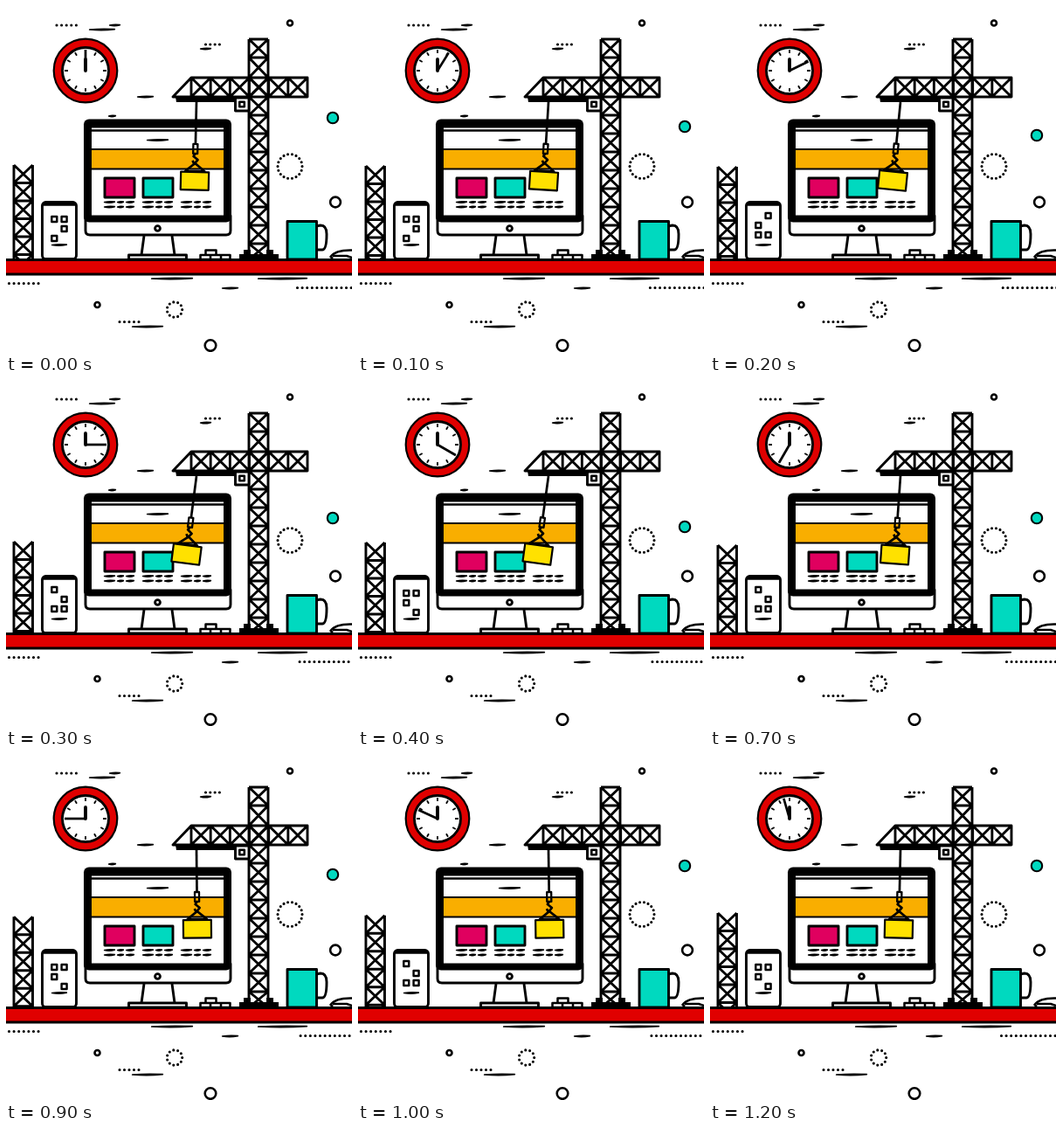
Recreate the animation shown at these times as an HTML page. Size 396 px wide and 396 px high, loop 1.3 s.

```html
<!DOCTYPE html>
<html lang="en">
<head>
<meta charset="utf-8">
<title>Website under construction</title>
<style>
  html, body { margin: 0; width: 100%; height: 100%; overflow: hidden; background: #fff; }
  #stage { display: block; width: 100vw; height: 100vh; stroke: #000; stroke-width: 2.9; fill: none; stroke-linejoin: round; }
  .dots { stroke-linecap: round; stroke-width: 3.1; }
  .ink { fill: #000; stroke-width: 1.7; }
  .white { fill: #fff; }
  .red { fill: #e00000; }
  .teal { fill: #00d9bf; }
</style>
</head>
<body>
<svg id="stage" viewBox="0 0 396 396">
  <g id="marks"></g>

  <g id="clock">
    <circle class="red" cx="91" cy="74" r="36.3" stroke-width="2.2"/>
    <circle class="white" cx="91" cy="74" r="26.5"/>
    <path id="ticks" stroke-width="1.8"/>
    <path d="M91 61V74" stroke-width="3.8" stroke-linecap="round"/>
    <path id="minute" d="M91 74V50" stroke-width="2.7"/>
  </g>

  <g id="monitor">
    <path class="white" d="M91 240H257V257Q257 262 252 262H96Q91 262 91 257Z"/>
    <rect x="89" y="129.500" width="169" height="118" rx="6" fill="#000" stroke="none"/>
    <rect class="white" x="98" y="139.500" width="151" height="100" stroke="none"/>
    <path d="M98 142.500H249" stroke-width="2.4"/>
    <rect x="98" y="164" width="151" height="22.500" fill="#f9ae00" stroke="none"/>
    <path d="M98 164H249M98 186.500H249" stroke-width="2.2"/>
    <rect x="113" y="197" width="34" height="22" fill="#e0005f"/>
    <rect class="teal" x="157" y="197" width="34" height="22"/>
    <circle cx="173.500" cy="254.500" r="2.9"/>
    <path d="M158 263L155 285M190 263L193 285"/>
    <rect class="white" x="140.500" y="285" width="66" height="5"/>
  </g>
  <g id="text"></g>

  <g stroke-width="2.5">
    <rect class="white" x="222.500" y="285" width="34" height="5"/>
    <path d="M228.500 285V279.500H240.500V285M234 285V290M246 285V290"/>
  </g>

  <path id="crane"/>
  <path d="M194 104H262V110H195ZM272 279H280V284H298V279H306V284H312V290H267V284H272Z" fill="#000" stroke="none"/>
  <rect class="white" x="262.500" y="105" width="15.500" height="15"/>
  <rect x="267.300" y="109.800" width="5.500" height="5.500" stroke-width="2.600"/>

  <g id="load" stroke-width="2.700">
    <path d="M218 110V158"/>
    <rect x="215.500" y="158" width="5" height="11" stroke-width="2.300"/>
    <path d="M218 169L216 172L221 176L217 181L215 177M218 180L207 189H229L218 180"/>
    <rect x="202" y="190" width="32" height="20.500" fill="#ffe100" stroke-width="2.200"/>
  </g>

  <svg width="396" height="290"><path id="tower"/></svg>

  <rect class="white" x="41.500" y="224.500" width="39" height="65" rx="4"/>
  <path d="M43 226.500H79" stroke-width="4.500"/>
  <path id="windows" stroke-width="2.400"/>

  <path d="M355 252L360 251Q367 251 367 261Q367 279 362 279H356"/>
  <rect class="teal" x="322" y="246.500" width="33.500" height="43.500"/>
  <path d="M396 279.500Q377 279 371.500 287L374 289M374 286H390L396 288" stroke-width="2.500"/>

  <rect class="red" x="-4" y="290.500" width="404" height="16.500"/>

  <circle id="ball" class="teal" cx="374" cy="128" r="6.200" stroke-width="2.100"/>
  <g id="slider"></g>
</svg>

<script>
const $ = id => document.getElementById(id);
const NS = 'http://www.w3.org/2000/svg';

function add(parent, tag, attrs) {
  const el = document.createElementNS(NS, tag);
  for (const k in attrs) el.setAttribute(k, attrs[k]);
  $(parent).append(el);
}

// A hand-drawn dash, thicker in the middle.
function dash(parent, x1, x2, y) {
  const m = (x1 + x2) / 2;
  add(parent, 'path', { class: 'ink', d: `M${x1 + .7} ${y}Q${m} ${y - 1.1} ${x2 - .7} ${y - .3}Q${m} ${y + 1.6} ${x1 + .7} ${y}Z` });
}

function dots(parent, x, y, n, gap) {
  let d = '';
  for (let i = 0; i < n; i++) d += `M${x + i * gap} ${y}h.01`;
  add(parent, 'path', { class: 'dots', d });
}

function dotRing(cx, cy, r, n) {
  let d = '';
  for (let i = 0; i < n; i++) {
    const a = i / n * 2 * Math.PI;
    d += `M${cx + r * Math.cos(a)} ${cy + r * Math.sin(a)}h.01`;
  }
  add('marks', 'path', { class: 'dots', d });
}

const ring = (cx, cy, r) => add('marks', 'circle', { cx, cy, r, 'stroke-width': 2.6 });
const cross = (x1, y1, x2, y2) => `M${x1} ${y1}L${x2} ${y2}M${x2} ${y1}L${x1} ${y2}`;

function mast(x1, x2, ys) {
  let d = `M${x1} ${ys[0]}V${ys.at(-1)}M${x2} ${ys[0]}V${ys.at(-1)}`;
  for (let i = 1; i < ys.length; i++) d += cross(x1, ys[i - 1], x2, ys[i]) + `M${x1} ${ys[i]}H${x2}`;
  return d;
}

[[118, 131, 22], [95, 125, 27], [222, 235, 49], [150, 169, 104], [117, 126, 126],
 [166, 214, 312], [288, 345, 312], [247, 266, 323], [144, 180, 367]]
  .forEach(a => dash('marks', ...a));
dots('marks', 58, 22, 5, 5.6);
dots('marks', 228.5, 44, 4, 5.3);
dots('marks', 3.5, 317.5, 7, 5.6);
dots('marks', 130, 361.5, 5, 5.5);
dots('slider', 333.5, 322.5, 13, 5.6);
ring(325, 19.5, 3);
ring(377, 224.5, 5.9);
ring(104.5, 342, 3);
ring(234, 388.5, 6.3);
dotRing(325, 183.5, 14, 18);
dotRing(193, 347.5, 8.7, 11);

dash('text', 161, 186, 153.5);
for (const x of [112, 156, 200])
  for (const y of [224.5, 230]) {
    dash('text', x, x + 13, y);
    dash('text', x + 15, x + 23, y);
    dash('text', x + 25, x + 35, y);
  }
dash('text', 52, 70, 273.5);
$('windows').after($('text').lastChild);

let ticks = '';
for (let i = 0; i < 12; i++) {
  const a = i * Math.PI / 6, s = Math.sin(a), c = Math.cos(a);
  ticks += `M${91 + 20 * s} ${74 - 20 * c}L${91 + 24 * s} ${74 - 24 * c}`;
}
$('ticks').setAttribute('d', ticks);

const levels = [38, 59, 82, 104];
for (let i = 1; i < 9; i++) levels.push(104 + i * 21);
levels.push(290);
let crane = mast(278, 300, levels) + 'M278 38H300M191 104L212 82H345V104Z';
for (let i = 0; i < 6; i++) {
  const x = 212 + i * 22.17;
  crane += cross(x, 82, x + 22.17, 104) + `M${x} 82V104`;
}
$('crane').setAttribute('d', crane);
$('tower').setAttribute('d', mast(9, 30.5, [0, 1, 2, 3, 4, 5, 6].map(i => 182 + i * 20.5)));

// Keys are [step, value] pairs, joined by straight lines.
function track(keys, t) {
  const i = Math.max(1, keys.findIndex(k => k[0] >= t));
  const [t0, v0] = keys[i - 1], [t1, v1] = keys[i];
  return v0 + (v1 - v0) * (t - t0) / (t1 - t0);
}

const drift = [[0, 0], [7, 1], [12, 0]];
const bounce = [[0, 0], [5, 50], [10, 0], [12, 0]];
const hand = [[0, 0], [2, 64], [3, 90], [9, 270], [12, 344]];
const swing = [[0, 1.3], [2, 5.7], [3, 7.3], [4, 7.8], [5, 7.3], [7, 4], [9, -.6], [10, -.8], [12, 1.3]];

// Window centres: left column, then right column.
const layouts = {
  A: [[244, 266], [244, 255]],
  B: [[251, 262], [240, 262]],
  C: [[240, 262], [251, 262]],
  D: [[244, 255], [244, 266]]
};
const order = 'AABCDDCCDDCCD';

function draw(now) {
  const step = Math.floor(now % 1300 / 100);
  const move = (id, value) => $(id).setAttribute('transform', value);
  move('minute', `rotate(${track(hand, step)} 91 74)`);
  move('load', `rotate(${track(swing, step)} 218 110)`);
  move('tower', `translate(0 ${7 * track(drift, step)})`);
  move('slider', `translate(${6 * track(drift, step)} 0)`);
  move('ball', `translate(0 ${track(bounce, step)})`);
  $('windows').setAttribute('d', layouts[order[step]].map((ys, i) =>
    ys.map(y => `M${52.3 + i * 11.3} ${y - 3}h6v6h-6z`).join('')).join(''));
}

const start = performance.now();
function tick() {
  draw(performance.now() - start);
  requestAnimationFrame(tick);
}
tick();
</script>
</body>
</html>
```
